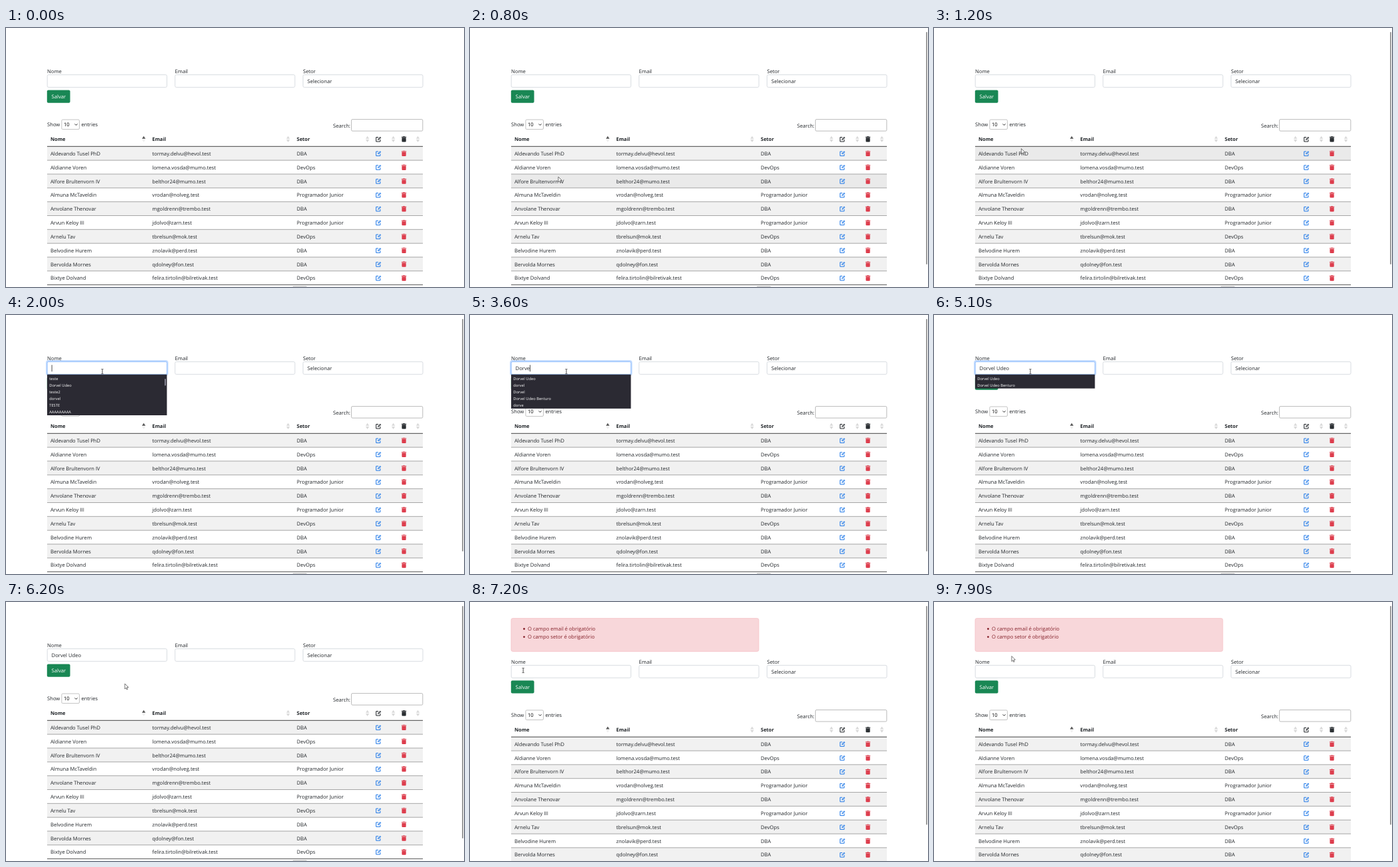
An HTML page with a canvas that plays this animation: 690x390 px, repeating every 8 s.

```html
<!DOCTYPE html>
<html lang="pt">
<head>
<meta charset="utf-8">
<title>Cadastro</title>
<style>
  html, body { margin: 0; width: 100%; height: 100%; overflow: hidden; background: #fff; }
  canvas { display: block; width: 690px; height: 390px; }
</style>
</head>
<body>
<canvas id="stage"></canvas>
<script>
const LOOP = 8000, STEP = 100;
const INK = '#212529', BLUE = '#2079e8', RED = '#dc3545';
const canvas = document.getElementById('stage');
const ctx = canvas.getContext('2d');
const dpr = window.devicePixelRatio || 1;
canvas.width = 690 * dpr;
canvas.height = 390 * dpr;

const people = [
  ['Aldevando Tusel PhD', 'tormay.delvu@hevol.test', 'DBA'],
  ['Aldianne Voren', 'lomena.vosda@mumo.test', 'DevOps'],
  ['Alfore Brultenvorn IV', 'belthor24@mumo.test', 'DBA'],
  ['Almuna McTaveldin', 'vrodan@nolveg.test', 'Programador Junior'],
  ['Anvolane Thenovar', 'mgoldrenn@trembo.test', 'DBA'],
  ['Arvun Keloy III', 'jdolvo@zarn.test', 'Programador Junior'],
  ['Arnelu Tav', 'tbrelsun@mok.test', 'DevOps'],
  ['Belvodine Hurem', 'znolavik@perd.test', 'DBA'],
  ['Bervolda Mornes', 'qdolney@fon.test', 'DBA'],
  ['Bixtye Dolvand', 'felira.tirtolin@bilretivak.test', 'DevOps']
];
const TOP = 178.4, PITCH = 20.84;

const NAME = 'Dorvel Udeo';
const keyTimes = [2900, 3200, 3400, 3500, 3600, 3700, 4000, 4300, 4500, 4600, 4800];
const OPEN = 1900, BLUR = 5600, HOVER = 6500, SAVED = 7000;

// pointer stops: time, x, y
const path = [
  [300, 252, 302], [800, 133, 224], [1100, 129, 212], [1400, 139, 95],
  [1700, 145, 85], [5400, 145, 85], [5800, 188, 116], [6200, 179, 123],
  [6600, 80, 103], [7500, 80, 103], [7700, 88, 99], [7900, 117, 81.5], [8000, 117, 81.5]
];

function pointerAt(t) {
  for (let i = 1; i < path.length; i++) {
    const [t0, x0, y0] = path[i - 1], [t1, x1, y1] = path[i];
    if (t <= t1) {
      const p = Math.max(0, (t - t0) / (t1 - t0));
      const e = p * p * (3 - 2 * p);
      return { x: x0 + (x1 - x0) * e, y: y0 + (y1 - y0) * e };
    }
  }
}

function text(s, x, y, { size = 7.67, color = INK, weight = 400 } = {}) {
  ctx.font = `${weight} ${size}px "Open Sans", "Noto Sans", sans-serif`;
  ctx.fillStyle = color;
  ctx.fillText(s, x, y + size * 0.36);
  return ctx.measureText(s).width;
}

function box(x, y, w, h, r, fill, stroke, lw = 0.8) {
  ctx.beginPath();
  ctx.roundRect(x, y, w, h, r);
  if (fill) { ctx.fillStyle = fill; ctx.fill(); }
  if (stroke) { ctx.strokeStyle = stroke; ctx.lineWidth = lw; ctx.stroke(); }
}

function rect(x, y, w, h, color) {
  ctx.fillStyle = color;
  ctx.fillRect(x, y, w, h);
}

function poly(points, fill, stroke, lw = 0.8) {
  ctx.beginPath();
  points.forEach(([x, y], i) => i ? ctx.lineTo(x, y) : ctx.moveTo(x, y));
  if (fill) { ctx.closePath(); ctx.fillStyle = fill; ctx.fill(); }
  if (stroke) { ctx.strokeStyle = stroke; ctx.lineWidth = lw; ctx.stroke(); }
}

function at(x, y, draw) {
  ctx.save();
  ctx.translate(x, y);
  draw();
  ctx.restore();
}

function editIcon(x, y, color, back) {
  at(x, y, () => {
    ctx.lineJoin = ctx.lineCap = 'round';
    poly([[-0.5, -3], [-3.4, -3], [-3.4, 3.5], [2.8, 3.5], [2.8, 0.8]], null, color, 1);
    poly([[-1.1, 1.3], [-0.8, -0.4], [2.6, -3.8], [4.1, -2.3], [0.6, 1]], color);
    poly([[0, 0.1], [2.3, -2.2]], null, back, 0.7);
  });
}

function trashIcon(x, y, color) {
  at(x, y, () => {
    rect(-3.6, -3.6, 7.2, 1.1, color);
    rect(-1.3, -4.2, 2.6, 0.9, color);
    box(-3.1, -2, 6.2, 6.1, [0, 0, 1, 1], color);
    ctx.globalAlpha = 0.2;
    for (const k of [-1.5, 0, 1.5]) rect(k - 0.2, -1, 0.4, 4, '#fff');
  });
}

function sortIcon(x, y, up) {
  poly([[x - 2.7, y - 0.6], [x, y - 4.6], [x + 2.7, y - 0.6]], up ? '#555' : '#d9d9d9');
  poly([[x - 2.7, y + 0.6], [x, y + 4.6], [x + 2.7, y + 0.6]], up ? '#efefef' : '#d9d9d9');
}

function form(typed, focused, hover) {
  text('Nome', 62, 65);
  text('Email', 254.5, 65);
  text('Setor', 447.5, 65);
  if (focused) box(60, 68, 184.5, 23.4, 4, '#c2dbfe');
  box(62.2, 70.4, 180.2, 18.9, 2, '#fff', focused ? '#86b7fe' : '#ced4da');
  box(254.7, 70.4, 180.5, 18.9, 2, '#fff', '#ced4da');
  box(447.5, 70.4, 180.5, 18.9, 2, '#fff', '#ced4da');
  text('Selecionar', 454, 80.3);
  box(61.8, 93.4, 34.8, 19.3, 2, hover ? '#157347' : '#198754');
  text('Salvar', 68.6, 103.7, { color: '#fff' });
  return text(typed, 68.6, 80.3);
}

function table(hoverRow) {
  text('Show', 62, 145.7);
  box(83.9, 138, 26.6, 14.6, 1.6, '#fff', '#b4b4b4');
  text('10', 86.9, 145.7, { color: '#000' });
  ctx.lineCap = 'butt';
  poly([[103.6, 144.4], [105.6, 146.4], [107.6, 144.4]], null, '#222', 1);
  text('entries', 113.4, 145.7);
  text('Search:', 492.8, 147);
  box(520.4, 137.6, 107.4, 17.5, 1.6, '#fff', '#aaa');

  const bold = { weight: 700, size: 7.5 };
  text('Nome', 67, 167.5, bold);
  text('Email', 220.3, 167.5, bold);
  text('Setor', 438, 167.5, bold);
  sortIcon(207.5, 167.3, true);
  for (const x of [425, 544.5, 583.5, 620.5]) sortIcon(x, 167.3);
  editIcon(561, 167.5, INK, '#fff');
  trashIcon(599.5, 167.3, INK);

  people.forEach((p, i) => {
    const top = TOP + i * PITCH, y = top + 10.7;
    const odd = i % 2 === 0;
    const back = i === hoverRow ? (odd ? '#eaeaea' : '#f6f6f6') : (odd ? '#f1f1f1' : '#fff');
    rect(62, top, 566, PITCH, back);
    if (i) rect(62, top - 0.6, 566, 1, '#a6a6a6');
    text(p[0], 67, y);
    text(p[1], 220.3, y);
    text(p[2], 438, y);
    editIcon(561, y - 0.1, BLUE, back);
    trashIcon(599.5, y - 0.1, RED);
  });
  rect(62, TOP - 0.6, 566, 1, '#444');
  rect(62, TOP + people.length * PITCH - 0.6, 566, 1, '#555');
  box(432, 389.3, 21, 17, 1, '#eee', '#aaa');
}

function suggestions(n) {
  const full = NAME + ' Benturo', first = NAME.slice(0, 6), low = first.toLowerCase();
  if (n === 0) return ['teste', NAME, 'teste2', low, 'TESTE', 'AAAAAAAAA'];
  if (n === 1) return [NAME, low, first, full, low.slice(0, 5), 'DEV'];
  if (n < 6) return [NAME, low, first, full, low.slice(0, 5)];
  if (n === 6) return [NAME, low, first, full];
  return [NAME, full];
}

function dropdown(n) {
  const list = suggestions(n);
  rect(62, 89.6, 180.4, list.length * 10.1 + 0.8, '#2b2a33');
  list.forEach((s, i) => text(s, 65.2, 95.5 + i * 10.1, { size: 5.75, color: '#fff', weight: 500 }));
  if (n === 0) box(239, 96, 1.8, 10.5, 0.9, '#8f8f9d');
}

function alertBox() {
  box(62, 24.6, 373, 49.8, 2.5, '#f8d7da', '#f5c2c7');
  ['O campo email é obrigatório', 'O campo setor é obrigatório'].forEach((s, i) => {
    const y = 40.2 + i * 12.1;
    ctx.beginPath();
    ctx.arc(81.5, y + 0.3, 1.4, 0, 7);
    ctx.fillStyle = '#842029';
    ctx.fill();
    text(s, 87, y, { color: '#842029' });
  });
}

function arrow() {
  poly([[0, 0], [0, 8], [1.8, 6.3], [3, 8.9], [4.2, 8.3], [3, 5.7], [5.5, 5.5], [0, 0]],
    '#fff', '#555', 0.8);
}

function beam() {
  rect(-0.3, -3.3, 0.8, 6.6, '#222');
  rect(-1.6, -3.7, 3.4, 0.7, '#444');
  rect(-1.6, 3.1, 3.4, 0.7, '#444');
}

function hand() {
  poly([[-1, 0], [0.4, 0], [0.6, 3], [4.4, 4], [4.2, 7], [3.2, 9], [-0.8, 9],
    [-3.2, 5.6], [-2.4, 4.8], [-1, 6], [-1, 0]], '#fff', '#333', 0.7);
}

function pointer(p, dy, overButton) {
  const overName = p.x > 62 && p.x < 242 && p.y > 70 + dy && p.y < 89.5 + dy;
  at(p.x, p.y, overButton ? hand : overName ? beam : arrow);
}

// the bar fades out while the mouse rests and returns when it moves
function scrollbar(t, height) {
  const fade = t < 5500 ? (4700 - t) / 400 : 1;
  ctx.globalAlpha = Math.min(1, Math.max(0, fade));
  box(687.1, 6, 1.7, height, 0.8, '#8c8c8c');
  ctx.globalAlpha = 1;
}

function render(t) {
  ctx.setTransform(dpr, 0, 0, dpr, 0, 0);
  ctx.textRendering = 'geometricPrecision';
  rect(0, 0, 690, 390, '#fff');

  const saved = t >= SAVED, dy = saved ? 24.9 : 0;
  const focused = t >= OPEN && t < BLUR;
  const hover = t >= HOVER && !saved;
  const keys = keyTimes.filter(k => k <= t);
  const p = pointerAt(t), seen = t >= 300;
  const row = seen ? Math.floor((p.y - dy - TOP) / PITCH) : -1;

  if (saved) alertBox();
  at(0, dy, () => {
    const width = form(saved ? '' : NAME.slice(0, keys.length), focused, hover);
    table(row);
    if (!focused) return;
    dropdown(keys.length);
    const since = t - Math.max(OPEN, ...keys);
    const lit = t < 5100 && since % 1000 < 500;
    if (lit) rect(68.7 + width, 75.2, 0.8, 10, '#222');
  });
  if (seen) {
    scrollbar(t, saved ? 329.5 : 350);
    pointer(p, dy, hover);
  }
}

function tick(now) {
  render(Math.floor((now % LOOP) / STEP) * STEP);
  requestAnimationFrame(tick);
}
requestAnimationFrame(tick);
</script>
</body>
</html>
```
